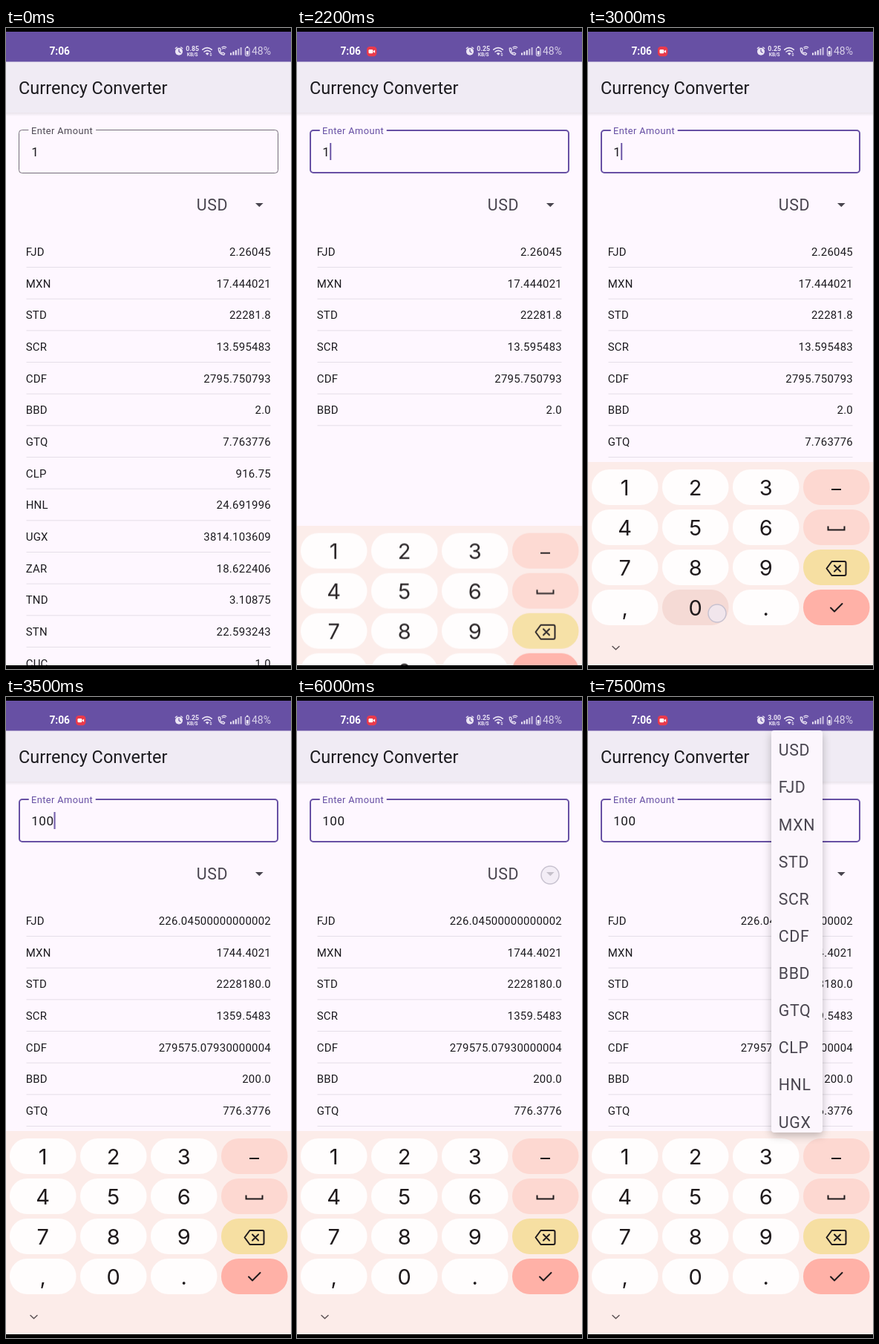
Recreate the animation shown at these times as an HTML page. Size 384 px wide and 864 px high, loop 8000 ms.

```html
<!DOCTYPE html>
<html lang="en">
<head>
<meta charset="utf-8">
<title>Currency Converter</title>
<style>
html, body { margin: 0; width: 100%; height: 100%; overflow: hidden; background: #fef7ff; }
#stage { position: relative; width: 384px; height: 864px; overflow: hidden; font-family: Roboto, sans-serif; }
svg { position: absolute; left: 0; top: 0; display: block; }
text { white-space: pre; }

.line { fill: none; stroke-linecap: round; stroke-linejoin: round; }
.row text { font-size: 14.93px; letter-spacing: .267px; fill: #1c1b1f; }
.end { text-anchor: end; }
.mid { text-anchor: middle; }
.big { font-size: 21.33px; letter-spacing: .667px; fill: #49454f; }
.amount { font-size: 17.07px; letter-spacing: .53px; fill: #1c1b1f; }
.key { font: 29px Inter, sans-serif; fill: #1f1a1c; }

/* hard switches */
.s { animation: 8s step-end infinite; }
.v1 { animation-name: v1; }
.v10 { opacity: 0; animation-name: v10; }
.v100 { opacity: 0; animation-name: v100; }
.r1 { animation-name: r1; }
.r2 { opacity: 0; animation-name: r2; }
.r3 { opacity: 0; animation-name: r3; }
.blur { animation-name: blur; }
.focus { opacity: 0; animation-name: focus; }
.label { fill: #4f4a55; animation-name: label; }
.late { animation-name: late; }
.cut { animation-name: blur2; }
.caret { opacity: 0; animation-name: caret; }
.touch { opacity: 0; animation-name: touch; }
.press { fill: #fffdfd; animation-name: press; }
@keyframes v1 { 0% { opacity: 1 } 40% { opacity: 0 } }
@keyframes v10 { 0% { opacity: 0 } 40% { opacity: 1 } 43.75% { opacity: 0 } }
@keyframes v100 { 0% { opacity: 0 } 43.75% { opacity: 1 } }
@keyframes r1 { 0% { opacity: 1 } 26.25% { opacity: 0 } }
@keyframes r2 { 0% { opacity: 0 } 26.25% { opacity: 1 } 78.75% { opacity: 0 } }
@keyframes r3 { 0% { opacity: 0 } 78.75% { opacity: 1 } }
@keyframes blur { 0% { opacity: 1 } 23.75% { opacity: 0 } }
@keyframes blur2 { 0% { opacity: 1 } 25% { opacity: 0 } }
@keyframes focus { 0% { opacity: 0 } 23.75% { opacity: 1 } }
@keyframes label { 0% { fill: #4f4a55 } 23.75% { fill: #6750a4 } }
@keyframes late { 0% { opacity: 1 } 25% { opacity: 0 } 28.75% { opacity: 1 } }
@keyframes caret {
  0% { opacity: 0; transform: none }
  22.5% { opacity: 1; transform: none }
  25% { opacity: 1; transform: translateX(10.1px) }
  31.25% { opacity: 0; transform: translateX(10.1px) }
  37.5% { opacity: 1; transform: translateX(10.1px) }
  40% { opacity: 1; transform: translateX(20.3px) }
  43.75% { opacity: 1; transform: translateX(30.4px) }
  50% { opacity: 0; transform: translateX(30.4px) }
  55% { opacity: 1; transform: translateX(30.4px) }
  62.5% { opacity: 0; transform: translateX(30.4px) }
  68.75% { opacity: 1; transform: translateX(30.4px) }
  75% { opacity: 0; transform: translateX(30.4px) }
}
@keyframes touch {
  0% { opacity: 0; transform: translate(134px, 179px) }
  22.5% { opacity: 1; transform: translate(134px, 179px) }
  23.75% { opacity: 0; transform: translate(174px, 789px) }
  36.25% { opacity: 1; transform: translate(174px, 789px) }
  38.75% { opacity: 0; transform: translate(174px, 789px) }
  41.25% { opacity: 1; transform: translate(173px, 788px) }
  43.75% { opacity: 0; transform: translate(341px, 240px) }
  75% { opacity: 1; transform: translate(341px, 240px) }
  77.5% { opacity: 0; transform: translate(341px, 240px) }
}
@keyframes press {
  0% { fill: #fffdfd } 36.25% { fill: #f5dad5 } 38.75% { fill: #fffdfd }
  41.25% { fill: #f5dad5 } 43.75% { fill: #fffdfd }
}

/* moving parts */
.rec { transform-origin: 100.5px 31.5px; animation: rec 8s infinite; }
.board { transform: translateY(274px); animation: board 8s infinite; }
.ripple { transform-origin: 341px 238px; animation: ripple 8s infinite; }
@keyframes rec {
  0%, 7.5% { transform: scale(0); opacity: 0; animation-timing-function: ease-out }
  12.5%, 100% { transform: none; opacity: 1 }
}
@keyframes board {
  0%, 25% { transform: translateY(274px); opacity: .8; animation-timing-function: ease-out }
  30%, 100% { transform: none; opacity: 1 }
}
@keyframes ripple {
  0%, 75% { transform: scale(.3); opacity: 0 }
  78%, 81.25% { transform: none; opacity: 1 }
  83.75%, 100% { transform: none; opacity: 0 }
}
#menu {
  position: absolute; overflow: hidden; border-radius: 4px; background: #fcf6fd;
  box-shadow: 0 4px 12px rgba(0, 0, 0, .25); animation: menu 8s infinite;
}
#menu svg { animation: items 8s infinite; }
@keyframes menu {
  0%, 77.5% { left: 302px; top: 238px; width: 0; height: 0; opacity: 0; animation-timing-function: cubic-bezier(.4, 0, .2, 1) }
  82.25%, 100% { left: 247px; top: 45px; width: 69px; height: 542px; opacity: 1 }
}
@keyframes items {
  0%, 77.5% { transform: translate(-34.5px, -271px); animation-timing-function: cubic-bezier(.4, 0, .2, 1) }
  82.25%, 100% { transform: none }
}
</style>
</head>
<body>
<div id="stage">
<svg width="384" height="864" viewBox="0 0 384 864">
  <defs>
    <linearGradient id="shade" x2="0" y2="1">
      <stop stop-color="#000" stop-opacity=".08"/><stop offset="1" stop-color="#000" stop-opacity="0"/>
    </linearGradient>
  </defs>
  <rect width="384" height="864" fill="#fef7ff"/>

  <g id="rows"></g>

  <!-- app bar -->
  <rect y="45" width="384" height="69" fill="#f0ebf4"/>
  <rect y="114" width="384" height="5" fill="url(#shade)"/>
  <text x="17.1" y="89" font-size="23.47" fill="#1c1b1f">Currency Converter</text>

  <!-- status bar -->
  <rect width="384" height="45.5" fill="#6750a4"/>
  <rect width="384" height="5" fill="#000"/>
  <text x="58.4" y="36" font-size="13.8" font-weight="600" fill="#fff">7:06</text>
  <g class="rec">
    <rect x="94" y="25" width="13.4" height="13.2" rx="4.2" fill="#e93a4c"/>
    <rect x="96.5" y="28.9" width="5.8" height="5.4" rx="1.4" fill="#fff"/>
    <path d="M102.6 31.2l2.5-1.7v4.2l-2.5-1.7z" fill="#fff"/>
  </g>
  <g fill="#ece6f5">
    <circle cx="233" cy="31.7" r="5"/>
    <path class="line" d="M228.3 27.6l2-1.7M237.7 27.6l-2-1.7" stroke="#ece6f5" stroke-width="1.3"/>
    <path class="line" d="M233 28.8v3l2 1.3" stroke="#6750a4" stroke-width="1.2"/>
    <g class="mid" font-weight="700" font-size="8.8">
      <text class="s r1" x="251.2" y="31">0.85</text>
      <text class="s r2" x="251.2" y="31">0.25</text>
      <text class="s r3" x="251.2" y="31">3.00</text>
      <text x="251.2" y="38" font-size="6.6">KB/S</text>
    </g>
    <g class="line" stroke="#ece6f5" stroke-width="1.6">
      <path d="M264.8 29.2q6.2-5 12.4 0M267 32q4.2-3.4 8.4 0"/>
      <path d="M286.2 27.2q-.4 7.6 7.4 9.2l1.2-2-2.4-1.5-1.4 1q-2-1-2.7-3l1.2-1.2-1.2-2.6z" stroke-width="1.2"/>
      <path d="M291.5 28.2q1.7-1.6 3.8-.4M290.8 26.2q3-2.2 6 0" stroke-width="1.1"/>
    </g>
    <path d="M268.8 34.2q2.4-1.7 4.8 0l-2.4 2.5z"/>
    <path d="M276 33.5l1.6 1.8h-3.2zM276 38l1.6-1.8h-3.2z"/>
    <path d="M302 33.5h2v3h-2zM305.4 31.7h2v4.8h-2zM308.8 30h2v6.5h-2z"/>
    <path d="M312.2 28h2v8.5h-2zM315.6 26h2v10.5h-2z" opacity=".75"/>
    <rect x="322.4" y="26.6" width="5.6" height="11" rx="1.5" fill="none" stroke="#ece6f5"/>
    <path d="M324 24.8h2.4v1.4h-2.4zM323.8 31h2.8v5.2h-2.8z"/>
    <text x="331" y="36" font-size="14" opacity=".85">48%</text>
  </g>

  <!-- amount field -->
  <g class="line" stroke-linecap="butt">
    <path class="s blur" d="M30 137.5H21.5a4 4 0 0 0-4 4V191.500a4 4 0 0 0 4 4H362.500a4 4 0 0 0 4-4V141.500a4 4 0 0 0-4-4H121.500" stroke="#746f79"/>
    <path class="s focus" d="M30 138H22a4 4 0 0 0-4 4V191a4 4 0 0 0 4 4H362a4 4 0 0 0 4-4V142a4 4 0 0 0-4-4H121.500" stroke="#6750a4" stroke-width="2"/>
  </g>
  <text class="s label" x="34" y="142.600" font-size="12.8" letter-spacing=".42">Enter Amount</text>
  <g class="amount">
    <text class="s v1" x="34.2" y="173">1</text>
    <text class="s v10" x="34.2" y="173">10</text>
    <text class="s v100" x="34.2" y="173">100</text>
  </g>
  <rect class="s caret" x="34.2" y="155" width="1.900" height="23" fill="#6750a4"/>

  <!-- currency picker -->
  <circle class="ripple" cx="341" cy="238" r="21.3" fill="#000" fill-opacity=".13"/>
  <text class="big" x="256.800" y="246.300">USD</text>
  <path d="M336 236h10.600l-5.300 5.300z" fill="#49454f"/>

  <g class="board">
    <rect y="585" width="384" height="280" fill="#fcece9"/>
    <g id="keys"></g>
    <g class="line" stroke="#1f1a1c" stroke-width="2">
      <path d="M328 622h13" stroke-linecap="butt"/>
      <path d="M323.500 671.500v5h22v-5" stroke-linecap="butt" stroke-linejoin="miter"/>
      <path d="M328.500 719H345.500q2 0 2 2V736q0 2-2 2H328.500L321.500 728.500zM332 724.500l8 8M340 724.500l-8 8"/>
      <path d="M327 781.500l5 5L342.500 776"/>
      <path d="M33 833.500l4.500 4.300 4.500-4.300" stroke="#5c5254" stroke-width="1.500"/>
    </g>
  </g>

  <g class="s touch">
    <circle r="12" fill="#efeaf3" fill-opacity=".75" stroke="#c8c2d0" stroke-width="1.500"/>
  </g>
  <rect y="859" width="384" height="5" fill="#000"/>
</svg>
<div id="menu"><svg id="items" width="69" height="542"></svg></div>
</div>

<script>
const rates = {
  FJD: 2.26045, MXN: 17.444021, STD: 22281.8, SCR: 13.595483, CDF: 2795.750793,
  BBD: 2, GTQ: 7.763776, CLP: 916.75, HNL: 24.691996, UGX: 3814.103609,
  ZAR: 18.622406, TND: 3.10875, STN: 22.593243, CUC: 1
};
const put = (id, html) => { document.getElementById(id).innerHTML = html; };
const money = n => Number.isInteger(n) ? n + '.0' : String(n);
const codes = Object.keys(rates);

put('rows', codes.map((code, i) => {
  const y = 307 + i * 42.667;
  const state = i < 6 ? '' : i === 6 ? 's late' : 's cut';
  const values = [1, 10, 100].map(n =>
    `<text class="s v${n} end" x="357" y="${y}">${money(rates[code] * n)}</text>`).join('');
  return `<g class="row ${state}"><text x="26.7" y="${y}">${code}</text>${values}` +
    `<rect x="27.500" y="${y + 15}" width="329" height="1" fill="#e5dfe8"/></g>`;
}).join(''));

const sideFill = ['#fdd8d1', '#fdd8d1', '#f6dfa2', '#ffb1a7'];
put('keys', ['123', '456', '789', ',0.'].map((chars, r) => {
  const y = 595 + r * 54;
  return [...chars, ''].map((ch, c) => {
    const x = 5 + c * 95;
    const press = ch === '0' ? 's press' : '';
    return `<rect class="${press}" x="${x}" y="${y}" width="89.500" height="48" rx="23.500"` +
      (press ? '' : ` fill="${c === 3 ? sideFill[r] : '#fffdfd'}"`) + '/>' +
      `<text class="key mid" x="${x + 44.7}" y="${y + 34.5}">${ch}</text>`;
  }).join('');
}).join(''));

put('items', ['USD', ...codes.slice(0, 10)].map((code, i) =>
  `<text class="big" x="9.700" y="${34.3 + i * 50.13}">${code}</text>`).join(''));
</script>
</body>
</html>
```
